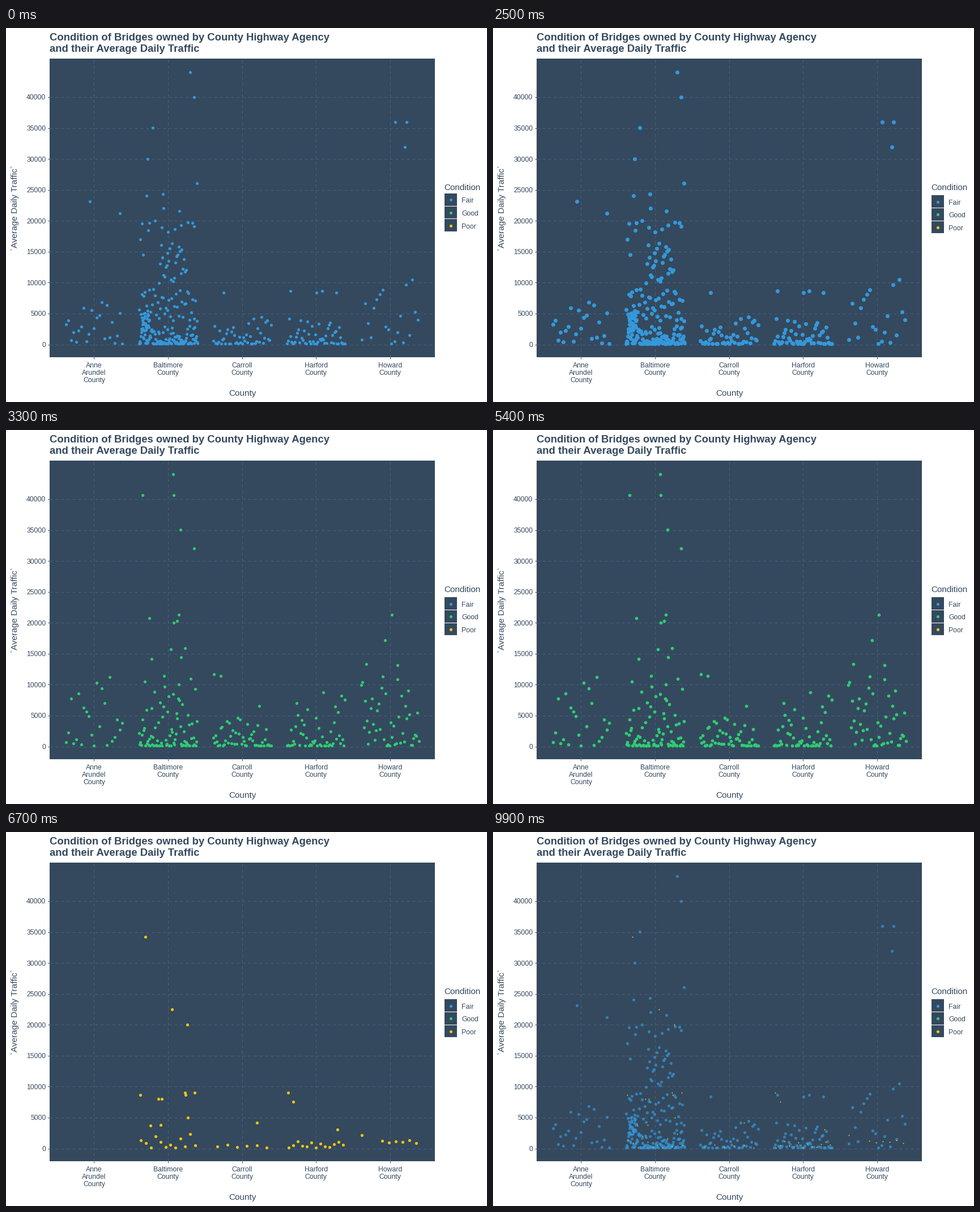
A matplotlib script that plays this animation: 849 by 660 pixels, repeating every 10 s.

```python
import numpy as np
import matplotlib.pyplot as plt
from matplotlib.animation import FuncAnimation
from matplotlib.patches import Rectangle

W, H, DPI = 849, 660, 64
PT = 72 / DPI
INK, GRID = "#34495e", "#46627f"
COLORS = {"Fair": "#3498db", "Good": "#2ecc71", "Poor": "#f1c40f"}
COUNTIES = ("Anne\nArundel", "Baltimore", "Carroll", "Harford", "Howard")
ANNE, BALT, CARROLL, HARFORD, HOWARD = range(5)
LEFT, TOP, RIGHT, BOTTOM = 77, 54, 757, 581
ZERO_Y = 558.5
FRAMES, STEP = 100, 100
STARTS = (20, 54, 87)      # first frame of each transition
LENGTH = 13                # frames per transition
DOT, SWELL, MIN_DOT = 5.2, 7, 2

rng = np.random.default_rng(11)


def county_x(n):
    return 155.5 + 130.6 * n


def cluster(county, n, reach, power=3, base=557, shift=0, half=52):
    """Jittered column of dots, crowded at its base and thinning upwards."""
    u = (np.arange(n) + 0.5) / n
    x = county_x(county) + shift + half * (2 * rng.permutation(u) - 1)
    return np.column_stack([x, base - reach * u ** power])


# Outliers by hand in stage pixels, the crowds by rule
fair = np.vstack([
    [(325, 78), (332, 122), (259, 176), (250, 231), (337, 274), (248, 296),
     (277, 293), (278, 318), (306, 323), (329, 344), (253, 344), (237, 373),
     (242, 400), (148, 306), (201, 327), (384, 467), (502, 464), (548, 467),
     (558, 464), (583, 467), (687, 166), (707, 166), (704, 210)],
    cluster(ANNE, 23, 75, 1.5),
    cluster(BALT, 9, 22, 1, 361),
    cluster(BALT, 26, 72, 1, 451, 8, 25),
    cluster(BALT, 42, 58, 1, 518),
    cluster(BALT, 24, 32, 1, 534, -40, 7),
    cluster(BALT, 104, 32, 2.5),
    cluster(CARROLL, 45, 48, 2.8),
    cluster(HARFORD, 52, 45, 2.9),
    cluster(HOWARD, 20, 118, 1.6),
])
good = np.vstack([
    [(295, 78), (241, 115), (296, 115), (308, 176), (332, 209), (253, 332),
     (305, 326), (302, 337), (296, 340), (257, 404), (291, 387), (316, 385),
     (309, 401), (367, 431), (379, 434), (447, 487), (681, 326), (669, 371),
     (636, 413), (691, 415)],
    cluster(ANNE, 23, 126, 1.9),
    cluster(BALT, 80, 125, 3.2),
    cluster(CARROLL, 48, 50, 2.8),
    cluster(HARFORD, 49, 98, 3.6),
    cluster(HOWARD, 44, 125, 1.9),
])
poor = np.vstack([
    [(246, 185), (293, 313), (320, 340), (237, 464), (269, 471), (275, 471),
     (316, 460), (317, 464), (333, 460), (321, 504), (255, 518), (273, 517),
     (443, 513), (498, 460), (507, 476), (585, 525), (628, 535)],
    cluster(BALT, 12, 26, 2),
    cluster(CARROLL, 6, 5, 1),
    cluster(HARFORD, 13, 12, 1.5),
    cluster(HOWARD, 6, 6, 1, 549, 16, 36),
])

plt.rcParams["font.family"] = "Liberation Sans"
fig = plt.figure(figsize=(W / DPI, H / DPI), dpi=DPI, facecolor="white")
ax = fig.add_axes([0, 0, 1, 1])
ax.set(xlim=(0, W), ylim=(H, 0))
ax.axis("off")


def text(x, y, s, px, ha="left", **kw):
    return ax.text(x, y, s, fontsize=px * PT, color=INK, ha=ha,
                   va="baseline", **kw)


def line(xs, ys, color, **kw):
    ax.plot(xs, ys, color=color, lw=PT, zorder=2, solid_capstyle="butt", **kw)


def box(x, y, w, h):
    return ax.add_patch(Rectangle((x, y), w, h, fc=INK, lw=0, zorder=1))


def dots(xy, color, d=DOT):
    x, y = np.transpose(xy)
    return ax.scatter(x, y, s=(d * PT) ** 2, c=color, linewidths=0, zorder=4)


def draw_axes():
    box(LEFT, TOP, RIGHT - LEFT, BOTTOM - TOP)
    dash = dict(dashes=(5, 5))
    for n in range(9):
        y = ZERO_Y - n * 54.57
        line([LEFT, RIGHT], [y, y], GRID, **dash)
        line([LEFT - 3, LEFT], [y, y], INK)
        text(70.5, y + 4.5, str(n * 5000), 12.3, "right")
    for n, name in enumerate(COUNTIES):
        x = county_x(n)
        line([x, x], [BOTTOM, TOP], GRID, **dash)
        line([x, x], [BOTTOM, BOTTOM + 3], INK)
        for row, word in enumerate((name + "\nCounty").split("\n")):
            text(x, 598.7 + 13.4 * row, word, 12.3, "center")
    text(77.5, 22, "Condition of Bridges owned by County Highway Agency",
         18.5, weight="bold")
    text(77.5, 42, "and their Average Daily Traffic", 18.5, weight="bold")
    text(417, 649, "County", 15.2, "center")
    text(20, 318, "`Average Daily Traffic`", 15.2, "center", rotation=90,
         rotation_mode="anchor")
    text(773.5, 286.5, "Condition", 15.2)


def draw_legend(top):
    parts = []
    for n, (name, color) in enumerate(COLORS.items()):
        y = top + n * 22.6
        parts += [box(774, y, 22, 21.6),
                  dots([(784.7, y + 11.3)], color),
                  text(804, y + 16.3, name, 12.3)]
    return parts


def show(parts, on):
    for p in parts:
        p.set_visible(on)


def back_in(t, s=1.70158):
    return t * t * ((s + 1) * t - s)


draw_axes()
first_legend = draw_legend(292)
legend = draw_legend(295.3)
layers = [dots(xy, c) for xy, c in zip((fair, good, poor), COLORS.values())]


def style(layer, d=DOT, alpha=1, z=4):
    layer.set_sizes([(d * PT) ** 2])
    layer.set_alpha(alpha)
    layer.set_zorder(z)
    layer.set_visible(True)


def update(i):
    show(first_legend, i == 0)
    show(legend, i > 0)
    show(layers, False)
    # Time since the latest transition began; the last state wraps to the first
    n = sum(i >= s for s in STARTS)
    k = i - STARTS[n - 1] if n else LENGTH
    if k >= LENGTH:
        style(layers[n % 3])
        return layers
    # Leaving dots swell, then shrink while the next ones fade in
    e = back_in((k + 1) / (LENGTH + 1))
    if e < 0.05:
        swell = min(1, (k + 2) / 7)
        style(layers[n - 1], DOT + (SWELL - DOT) * swell, z=5)
    else:
        style(layers[n - 1], max(MIN_DOT, DOT * (1 - e)), z=5)
        style(layers[n % 3], alpha=e)
    return layers


anim = FuncAnimation(fig, update, frames=FRAMES, interval=STEP, repeat=True,
                     repeat_delay=0, blit=False)
plt.show()
```
